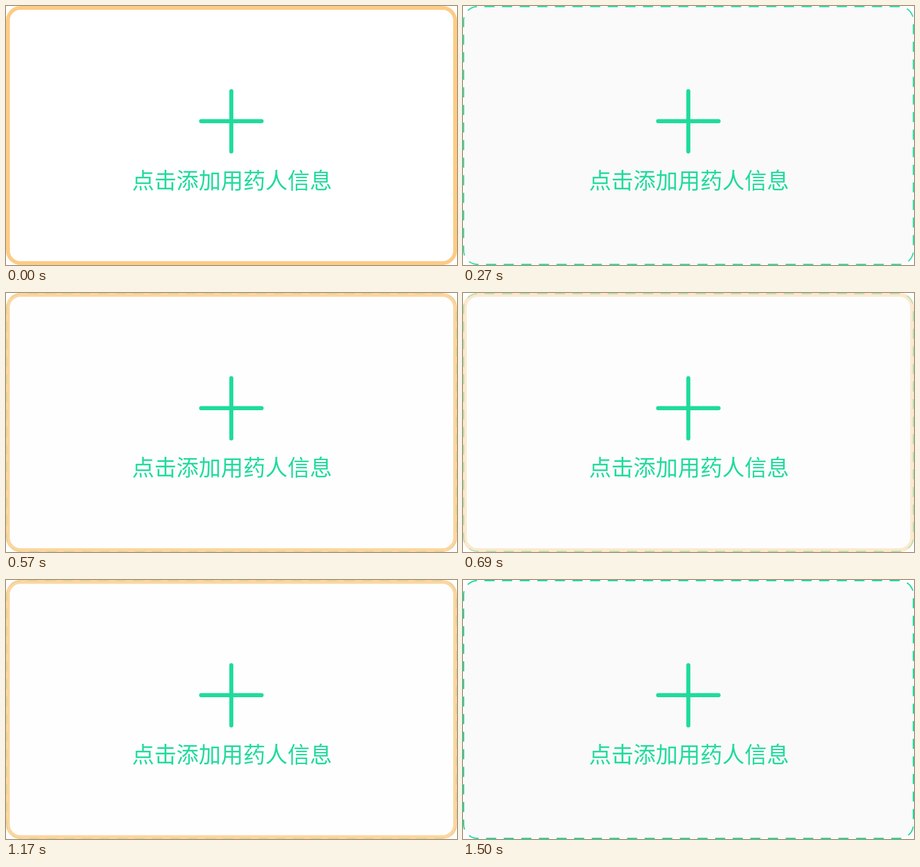
These frames come from a looping animation (714 px wide and 411 px high, 4830 ms). An HTML page:

```html
<!DOCTYPE html>
<html lang="zh-CN">
<head>
<meta charset="utf-8">
<title>点击添加用药人信息</title>
<style>
  /* 0 = solid orange card, 1 = dashed green card */
  @property --mix {
    syntax: '<number>';
    inherits: true;
    initial-value: 0;
  }

  html, body {
    margin: 0;
    width: 100%;
    height: 100%;
    overflow: hidden;
    background: #fff;
  }

  svg {
    display: block;
    width: 714px;
    height: 411px;
    animation: blink 4830ms steps(10, end) -2ms infinite;
  }

  .solid {
    fill: #fff;
    stroke: #fdcb84;
    stroke-width: 6;
    opacity: calc(1 - 1.5 * var(--mix));
  }

  .dashed {
    fill: #fafafa;
    stroke: #1fdb9b;
    stroke-width: 2;
    stroke-dasharray: 16 12;
    stroke-dashoffset: -11;
    opacity: var(--mix);
  }

  .plus {
    fill: none;
    stroke: #1fdb9b;
    stroke-width: 6.4;
    stroke-linecap: round;
  }

  text {
    fill: #1fdb9b;
    font: 400 35.2px 'Noto Sans CJK SC', 'Noto Sans CJK', sans-serif;
  }

  /* five 300 ms fades, then a long hold */
  @keyframes blink {
    0%        { --mix: 0; }
    6.21118%  { --mix: 1; }
    12.42236% { --mix: 0; }
    18.63354% { --mix: 1; }
    24.84472% { --mix: 0; }
    31.05590% { --mix: 1; }
    100%      { --mix: 1; }
  }
</style>
</head>
<body>
<svg viewBox="0 0 714 411">
  <rect class="solid" x="3" y="3" width="708" height="405" rx="20"/>
  <rect class="dashed" x="1" y="1" width="712" height="409" rx="22" pathLength="2212"/>
  <path class="plus" d="M356.7 135.2V230.8M309 182.8H404.6"/>
  <text x="199.5" y="290.3">点击添加用药人信息</text>
</svg>
</body>
</html>
```
